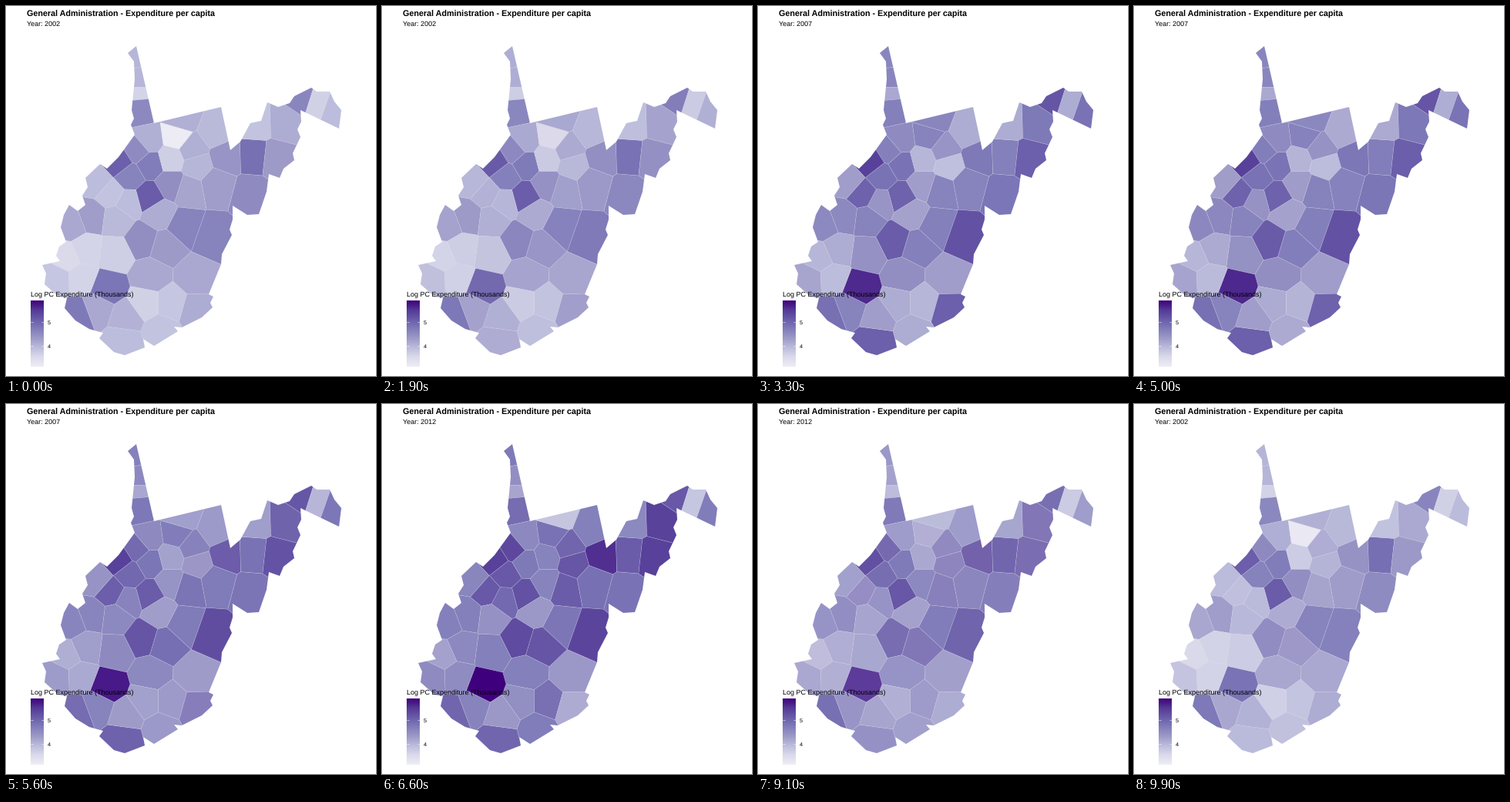
A matplotlib script that plays this animation: 480 by 480 pixels, repeating every 10 s.

```python
import matplotlib.pyplot as plt
import numpy as np
from matplotlib.animation import FuncAnimation
from matplotlib.collections import PolyCollection
from matplotlib.colors import LinearSegmentedColormap
from matplotlib.path import Path

plt.rcParams["font.family"] = ["Liberation Sans", "DejaVu Sans"]
plt.rcParams["text.hinting"] = "none"

SIZE, FRAMES, STEP = 480, 100, 100
YEARS = (2002, 2007, 2012)
TOP = 7
PURPLES = LinearSegmentedColormap.from_list("ramp", [
    "#efedf5", "#dadaeb", "#bcbddc", "#9e9ac8",
    "#807dba", "#6a5ca9", "#543b96", "#3f007d"], N=512)

# state border: eastern side from the northern tip down, then back up the rivers
EAST = [(169, 52), (192, 152), (279, 131), (291, 187), (304, 176), (317, 152),
        (331, 149), (339, 125), (353, 131), (368, 126), (374, 117), (396, 106),
        (403, 111), (420, 111), (426, 124), (435, 135), (432, 159), (382, 135),
        (383, 150), (378, 160), (382, 170), (372, 191), (374, 200), (360, 211),
        (355, 223), (341, 218), (338, 241), (328, 270), (313, 271), (294, 259),
        (294, 277), (290, 290), (293, 297), (280, 322), (279, 335), (263, 374)]
WEST = [(269, 377), (265, 385), (268, 391), (254, 404), (228, 417), (218, 416),
        (223, 422), (192, 441), (178, 432), (180, 443), (154, 453), (140, 449),
        (121, 431), (126, 424), (108, 419), (90, 408), (76, 392), (79, 379),
        (68, 377), (50, 361), (52, 347), (47, 336), (70, 331), (65, 324),
        (69, 312), (78, 306), (71, 287), (75, 271), (82, 258), (93, 266),
        (103, 258), (99, 246), (106, 235), (103, 223), (122, 205), (131, 211),
        (146, 196), (167, 167), (162, 154), (166, 146), (163, 135), (167, 95),
        (166, 72), (158, 61)]

# county centre x, y and its place on the 0-7 ramp in each year
NORTH = [
    (167, 59, 2.2, 3.7, 4.1), (174, 101, 2.2, 3.7, 3.4), (174, 110, 1.2, 2.6, 2.7),
    (176, 133, 3.6, 3.9, 4.5), (185, 175, 2.4, 3.5, 3.6), (171, 187, 3.5, 3.9, 5.6),
    (146, 203, 4.9, 5.8, 5.8), (160, 221, 3.8, 4.3, 5.1), (187, 205, 4, 4.3, 4.1),
    (214, 198, 1.4, 2.2, 3.8), (221, 170, .1, 3.8, 4.3), (228, 146, 2.4, 3.7, 1.7),
    (272, 163, 2.1, 2.5, 3.9), (241, 186, 2.4, 3.2, 4.7), (247, 207, 2.2, 1.9, 5.2)]
MOUNTAINS = [
    (286, 196, 3.2, 4.1, 6.2), (322, 195, 4.4, 3.9, 5), (325, 152, 1.8, 2.5, 3.6),
    (361, 151, 2.5, 4.1, 5.8), (383, 118, 3.7, 5.2, 5.1), (405, 125, 1.3, 2.5, 1.7),
    (425, 132, 2, 4.3, 4), (349, 198, 3, 4.9, 5.8), (318, 243, 3.5, 4.2, 4.3),
    (273, 231, 2.9, 3.8, 4.4), (236, 238, 2.7, 3.8, 5), (214, 231, 3.4, 2.9, 3.8),
    (231, 286, 3.8, 3.9, 4.2), (268, 299, 3.8, 5.3, 5.7), (245, 352, 2.6, 2.9, 3.1)]
WEST_CENTRE = [
    (185, 248, 5, 4.8, 5.3), (159, 255, 2, 3.2, 4.6), (136, 243, 1.8, 4.8, 5.1),
    (119, 228, 2, 2.9, 3.7), (111, 273, 2.9, 3.6, 3.9), (85, 283, 2.6, 3.6, 3.9),
    (143, 277, 2.1, 3.8, 3.3), (198, 269, 2.5, 2.8, 3.1), (177, 303, 3.4, 5, 5.5),
    (207, 312, 3, 3.9, 5.2), (141, 321, 1.4, 3.3, 3.9), (104, 316, 1.2, 2.5, 3.6),
    (79, 327, 1, 2.2, 2.8)]
SOUTH = [
    (188, 350, 2.6, 3.4, 3.9), (181, 386, 1.3, 2.5, 3.4), (131, 366, 4.2, 6.3, 7),
    (214, 386, 1.7, 2.2, 4.4), (246, 395, 2.5, 4.9, 2.5), (201, 421, 1.8, 2.5, 4),
    (152, 434, 2, 4.9, 4.7), (156, 404, 2.3, 2.9, 3.1), (94, 401, 4.1, 4.4, 4.7),
    (118, 392, 2.6, 3.8, 3.8), (97, 353, 1.2, 2, 3.5), (66, 354, 1.7, 2.7, 3.5)]


def cut(poly, point, normal):
    """Keep the part of a convex polygon behind the line through point."""
    kept = []
    for a, b in zip(poly, np.roll(poly, -1, axis=0)):
        da, db = (a - point) @ normal, (b - point) @ normal
        if da <= 0:
            kept.append(a)
        if da * db < 0:
            kept.append(a + (b - a) * da / (da - db))
    return np.array(kept)


def cell(k, sites):
    """Area nearer to site k than to any other site."""
    poly = np.array([(0, 0), (SIZE, 0), (SIZE, SIZE), (0, SIZE)], float)
    for j, other in enumerate(sites):
        if j != k:
            poly = cut(poly, (sites[k] + other) / 2, other - sites[k])
    return poly


data = np.array(NORTH + MOUNTAINS + WEST_CENTRE + SOUTH, float)
sites = data[:, :2]
fills = PURPLES(data[:, 2:].T / TOP)[..., :3]  # year, county, RGB

fig = plt.figure(figsize=(SIZE / 72, SIZE / 72), dpi=72, facecolor="white")
ax = fig.add_axes([0, 0, 1, 1])
ax.axis("off")
ax.imshow(np.linspace(1, 0, 256)[:, None], cmap=PURPLES, aspect="auto",
          extent=(32, 49, 468.5, 382.5), zorder=2)
ax.set(xlim=(0, SIZE), ylim=(SIZE, 0))

land = PolyCollection([cell(k, sites) for k in range(len(sites))],
                      facecolors=fills[0], edgecolors=(0.84, 0.83, 0.91, 0.5),
                      linewidths=0.4, zorder=1)
ax.add_collection(land, autolim=False)
land.set_clip_path(Path(EAST + WEST + EAST[:1]), ax.transData)


def label(x, y, text, size, **kw):
    return ax.text(x, y, text, fontsize=size, color="black", va="baseline", zorder=4, **kw)


label(27.2, 13.3, "General Administration - Expenditure per capita", 10.8, weight="bold")
year = label(27.2, 26, "Year: 2002", 9)
label(31.8, 377, "Log PC Expenditure (Thousands)", 9)

for value, y in ((5, 410.3), (4, 441)):
    label(53.7, y + 2.7, str(value), 7.2)
    for x in (32, 45.6):
        ax.plot([x, x + 3.4], [y, y], color="white", lw=0.5, zorder=3)

THIRD = FRAMES / 3  # a still half, then a changing half


def draw(i):
    k, rest = divmod(i + 0.6, THIRD)
    k = int(k)
    nxt = (k + 1) % 3
    p = max(0, 2 * rest / THIRD - 1)
    land.set_facecolor(fills[k] + (fills[nxt] - fills[k]) * p)
    year.set_text(f"Year: {YEARS[nxt if p > 0.55 else k]}")
    return land, year


anim = FuncAnimation(fig, draw, frames=FRAMES, interval=STEP, repeat=True, repeat_delay=0)
plt.show()
```
